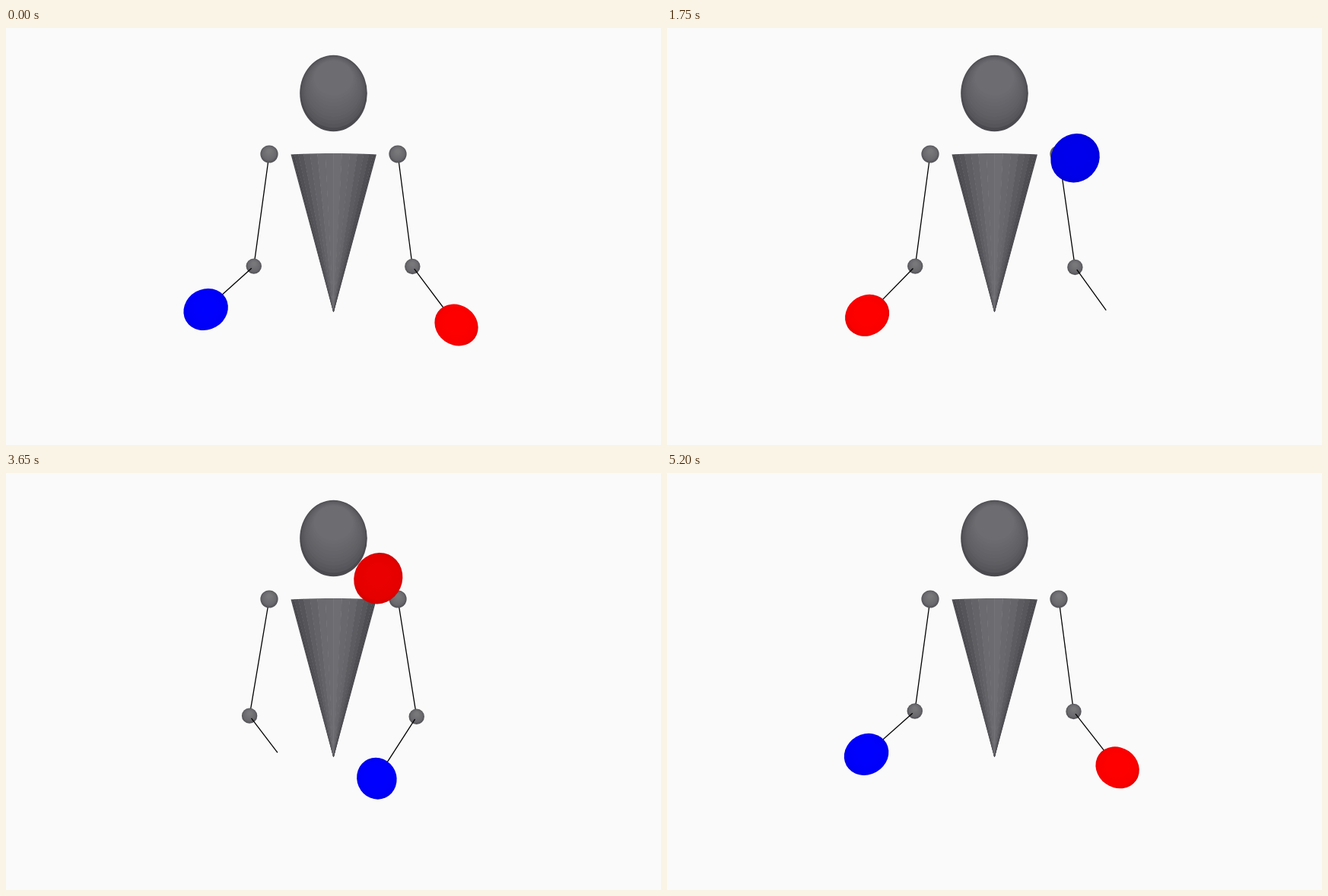
Animation of 861x549 px, one loop 5.25 s. Source, as an HTML page with a canvas:

```html
<!DOCTYPE html>
<html lang="en">
<head>
<meta charset="utf-8">
<title>Juggler</title>
<style>
html, body { margin: 0; height: 100%; overflow: hidden; background: #fafafa; }
canvas { display: block; }
</style>
</head>
<body>
<canvas id="stage" width="861" height="549"></canvas>
<script>
const ctx = document.getElementById('stage').getContext('2d');
const BEAT = 525, LOOP = 10 * BEAT, HALF = LOOP / 2;
const CX = 430.5, CY = 274.5, FOCAL = 368;
const CATCH = [592, 391], THROW = [484.5, 391];

const mod = (a, n) => ((a % n) + n) % n;
const mix = (a, b, k) => a + (b - a) * k;
const mirror = ([x, y]) => [2 * CX - x, y];
const rgb = (r, g, b) => `rgb(${Math.round(r)},${Math.round(g)},${Math.round(b)})`;
const grey = v => rgb(v, v, v + 5);

function bezier(a, b, c, d, u) {
  const v = 1 - u;
  return a.map((p, i) => v * v * v * p + 3 * u * v * v * b[i] + 3 * u * u * v * c[i] + u * u * u * d[i]);
}

const carry = u => bezier(CATCH, [584.8, 424.6], [501.6, 475.4], THROW, u);
const hold = u => bezier(CATCH, [609, 359.1], [592, 368.2], CATCH, u);
const reach = u => bezier(THROW, [470.4, 357.3], [593, 352.7], CATCH, u);

// Right hand over one loop, in beats
function rightHand(t) {
  const b = mod(t, LOOP) / BEAT;
  if (b < 1) return carry(b);
  if (b < 4) return reach((b - 1) / 3);
  if (b < 6) return hold((b - 4) / 2);
  if (b < 7) return carry(b - 6);
  if (b < 8) return reach(b - 7);
  return hold((b - 8) / 2);
}

// The left hand does the same half a loop later
const hand = (t, left) => left ? mirror(rightHand(t + HALF)) : rightHand(t);

// Perspective flight from the right hand to the left
function flight(f) {
  const h = 4 * f * (1 - f), s = 1 / (1 - 0.1736 * h);
  return [CX + mix(54, -161.5, f) * s, CY + (116.5 - 229.3 * h) * s, s];
}

function ballAt(t) {
  const u = mod(t - BEAT, LOOP), fromLeft = u >= HALF, v = u % HALF;
  if (v < 2 * BEAT) {
    const [x, y, s] = flight(v / (2 * BEAT));
    return [fromLeft ? 2 * CX - x : x, y, s];
  }
  const [x, y] = hand(t, !fromLeft);
  return [x, y, 1 - (y - 391) * 0.0008];
}

function ellipse(x, y, rx, ry, fill, turn = 0) {
  ctx.fillStyle = fill;
  ctx.beginPath();
  ctx.ellipse(x, y, rx, ry, turn, 0, 7);
  ctx.fill();
}

function line([x1, y1], [x2, y2]) {
  ctx.beginPath();
  ctx.moveTo(x1, y1);
  ctx.lineTo(x2, y2);
  ctx.stroke();
}

function joint(x, y, r) {
  const g = ctx.createRadialGradient(x, y - r * 0.35, r * 0.2, x, y, r);
  g.addColorStop(0, '#78787b');
  g.addColorStop(0.7, '#69696d');
  g.addColorStop(1, '#505054');
  ellipse(x, y, r, r, g);
}

function head() {
  const n = 10;
  for (let i = 0; i <= n; i++) {
    const k = i / n;
    ellipse(CX, mix(86, 66, k), mix(44.3, 26, k), mix(50.2, 23, k), grey(mix(74, 108, Math.sqrt(k))));
  }
}

function torso() {
  const n = 16, edge = i => -Math.cos(i * Math.PI / n);
  for (let i = 0; i < n; i++) {
    const a = edge(i), b = edge(i + 1), m = (a + b) / 2;
    ctx.fillStyle = grey(mix(109, 72, m * m) - (i % 2) * 2);
    ctx.beginPath();
    ctx.moveTo(CX + 56 * a, 165 + 1.5 * a * a);
    ctx.lineTo(CX + 56 * b + 0.4, 165 + 1.5 * b * b);
    ctx.lineTo(CX + 0.3, 374);
    ctx.lineTo(CX - 0.3, 374);
    ctx.fill();
  }
}

function arm(t, left) {
  const side = p => left ? mirror(p) : p;
  const [hx, hy] = left ? mirror(hand(t, true)) : hand(t, false);
  const bend = CATCH[0] - hx;
  const ex = 534.3 + 0.0586 * bend + 0.0636 * (CATCH[1] - hy);
  const ey = 314 + 0.064 * bend;
  const len = Math.hypot(hx - ex, hy - ey);
  const start = [ex + (hx - ex) * 4 / len, ey + (hy - ey) * 4 / len];
  const shoulder = side([515, 166]), elbow = side([ex, ey]);
  line(shoulder, elbow);
  joint(...shoulder, 11.6);
  joint(...elbow, 10.2);
  line(side(start), side([hx, hy]));
}

function ball(t, tint) {
  const [x, y, s] = ballAt(t), dx = x - CX, dy = y - CY;
  const r = 26.2 * s, long = r * Math.hypot(1, Math.hypot(dx, dy) / FOCAL);
  const light = mix(234, 255, Math.max(0, Math.min(1, (y - 138) / 240)));
  const g = ctx.createRadialGradient(x, y - r * 0.15, r * 0.35, x, y, long);
  g.addColorStop(0, tint(light));
  g.addColorStop(0.75, tint(light - 5));
  g.addColorStop(1, tint(light - 28));
  ellipse(x, y, long, r, g, Math.atan2(dy, dx));
}

function draw(now) {
  const t = Math.floor(now % LOOP / 50) * 50;
  ctx.fillStyle = '#fafafa';
  ctx.fillRect(0, 0, 861, 549);
  ctx.strokeStyle = '#000';
  ctx.lineWidth = 1.3;
  head();
  torso();
  arm(t, true);
  arm(t, false);
  ball(t, v => rgb(v, 0, 0));
  ball(t + 4 * BEAT, v => rgb(0, 0, v));
}

const begin = performance.now();
function tick() {
  draw(performance.now() - begin);
  requestAnimationFrame(tick);
}
tick();
</script>
</body>
</html>
```
